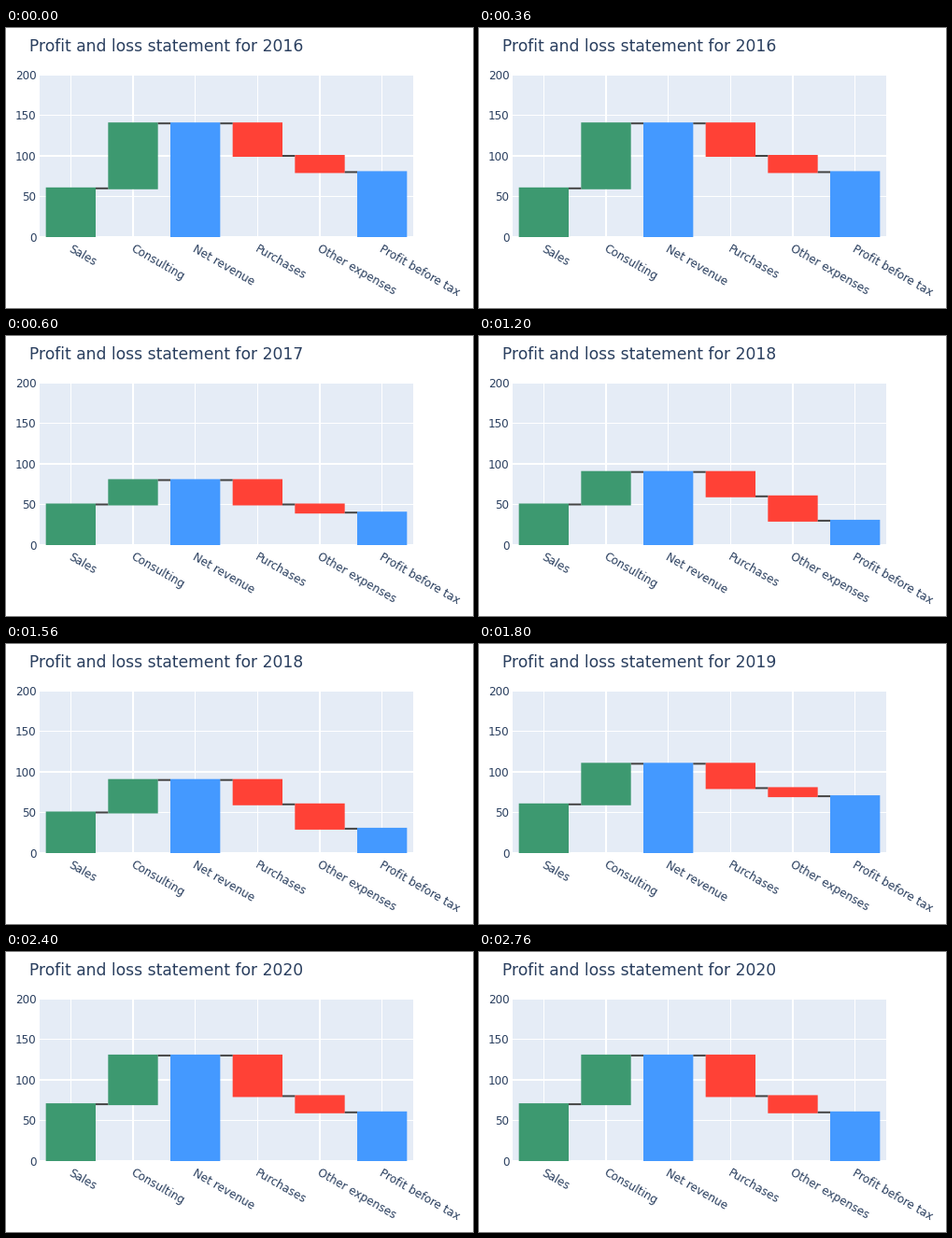
Write a matplotlib script that moves like this. It is 500x300 px and loops after 3000 ms.

```python
import math

import matplotlib.pyplot as plt
from matplotlib.animation import FuncAnimation
from matplotlib.patches import Rectangle

W, H, DPI = 500, 300, 100
LEFT, RIGHT, TOP, BASE = 36, 436, 50, 224
INK, PANEL, LINK = "#2a3f5f", "#e5ecf6", "#444444"
GREEN, RED, BLUE = "#3d9970", "#ff4136", "#4499ff"

LABELS = ["Sales", "Consulting", "Net revenue",
          "Purchases", "Other expenses", "Profit before tax"]
COLORS = [GREEN, GREEN, BLUE, RED, RED, BLUE]
# year: sales, consulting, purchases, other expenses
YEARS = {
    2016: (60, 80, -40, -20),
    2017: (50, 30, -30, -10),
    2018: (50, 40, -30, -30),
    2019: (60, 50, -30, -10),
    2020: (70, 60, -50, -20),
}

STEP = (RIGHT - LEFT) / len(LABELS)
BAR = 0.8 * STEP

plt.rcParams["font.family"] = "DejaVu Sans"

fig = plt.figure(figsize=(W / DPI, H / DPI), dpi=DPI, facecolor="white")
ax = fig.add_axes([0, 0, 1, 1])
ax.set_xlim(0, W)
ax.set_ylim(H, 0)
ax.axis("off")


def y_of(value):
    return BASE - value * (BASE - TOP) / 200


def center(i):
    return LEFT + (i + 0.5) * STEP


def box(x0, y0, x1, y1, color, z=1):
    patch = Rectangle((x0, y0), x1 - x0, y1 - y0, fc=color, lw=0,
                      snap=False, zorder=z)
    return ax.add_patch(patch)


def text(x, y, s, px=12, **kw):
    return ax.text(x, y, s, fontsize=px * 72 / DPI, color=INK,
                   va="baseline", **kw)


def crisp(c):
    """Whole pixels whose centres touch a line of width 1 at c."""
    c = round(c, 6)
    return math.ceil(c - 1), math.floor(c) + 1


def levels(year):
    """Start and end value of each bar."""
    sales, consulting, purchases, other = YEARS[year]
    net = sales + consulting
    rest = net + purchases
    profit = rest + other
    return [(0, sales), (sales, net), (0, net),
            (net, rest), (rest, profit), (0, profit)]


box(LEFT, TOP, RIGHT, BASE, PANEL)
for i, label in enumerate(LABELS):
    x0, x1 = crisp(center(i))
    box(x0, TOP, x1, BASE, "white", 2)
    text(center(i) - 3.5, 238.7, label, ha="left",
         rotation=-30, rotation_mode="anchor")
for value in range(0, 201, 50):
    y0, y1 = crisp(y_of(value))
    box(LEFT, y0, RIGHT, y1, "white", 2)
    text(32.4, y_of(value) + 4.9, str(value), ha="right")

title = text(25, 25.4, "", 17.1, ha="left")
bars = [box(0, 0, 1, 1, c, 3) for c in COLORS]
links = [box(0, 0, 1, 1, LINK, 4) for _ in LABELS[1:]]


def draw(frame):
    year = list(YEARS)[frame]
    title.set_text(f"Profit and loss statement for {year}")
    spans = levels(year)
    for i, (bar, span) in enumerate(zip(bars, spans)):
        top = y_of(max(span)) - 1
        bottom = min(y_of(min(span)) + 1, BASE)
        bar.set_bounds(center(i) - BAR / 2, top, BAR, bottom - top)
    for i, link in enumerate(links):
        link.set_bounds(center(i) + BAR / 2, y_of(spans[i][1]) - 1,
                        STEP - BAR, 2)
    return [title, *bars, *links]


anim = FuncAnimation(fig, draw, frames=len(YEARS), interval=600,
                     repeat=True, repeat_delay=0, blit=False)
plt.show()
```
